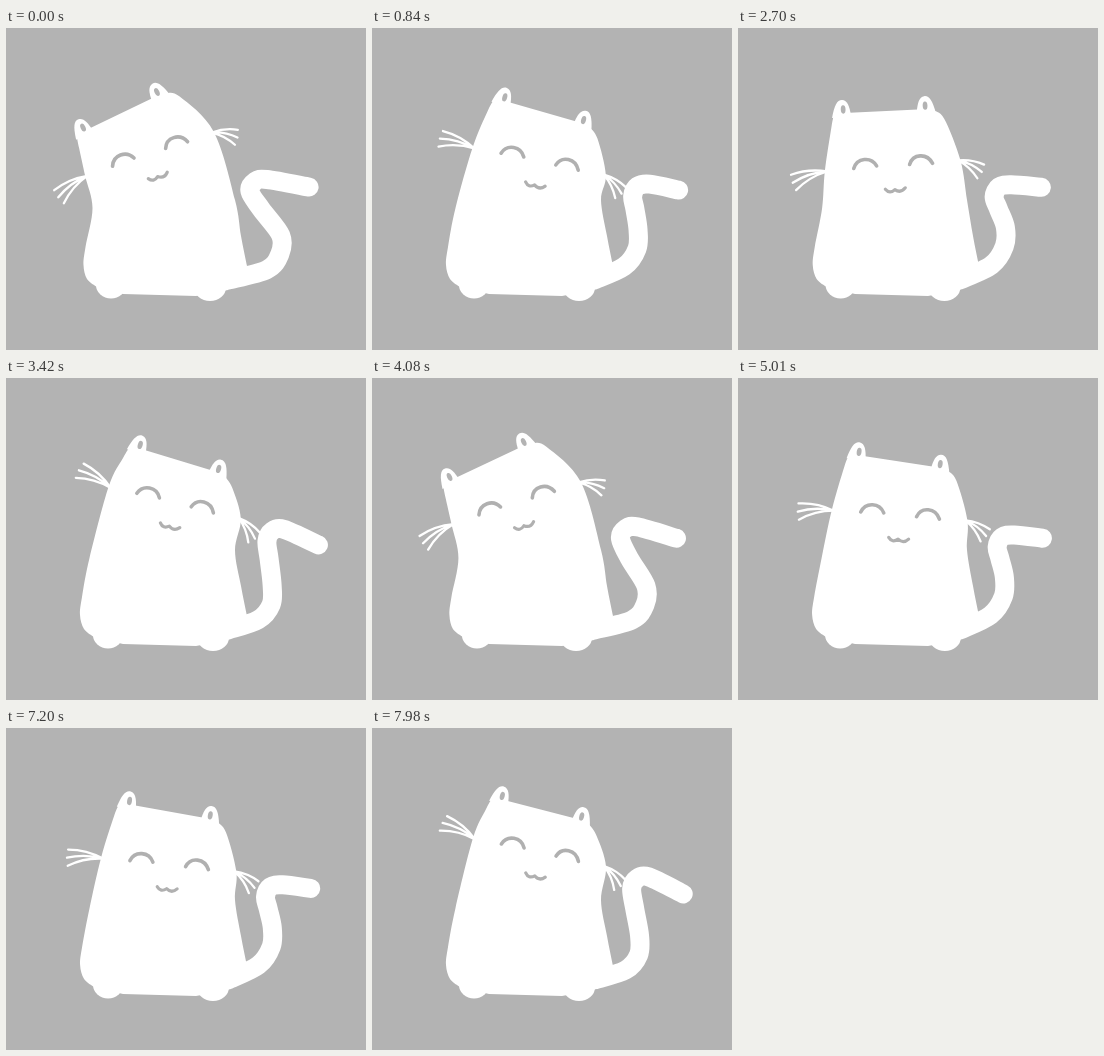
Recreate the animation shown at these times as an HTML page. Size 360x322 px, loop 8000 ms.

```html
<!DOCTYPE html>
<html lang="en">
<head>
<meta charset="utf-8">
<title>Swaying cat</title>
<style>
  html, body { margin: 0; width: 100%; height: 100%; overflow: hidden; background: #b3b3b3; }
  svg { display: block; width: 100vw; height: 100vh; }
  #cat { filter: blur(.6px); }
  .line { fill: none; stroke-linecap: round; stroke-linejoin: round; }
</style>
</head>
<body>
<svg viewBox="0 0 360 322">
  <rect width="360" height="322" fill="#b3b3b3"/>
  <g id="cat">
    <path id="tail" class="line" stroke="#fff" stroke-width="19"/>
    <path id="whiskers" class="line" stroke="#fff" stroke-width="2.3"/>
    <ellipse id="footL" cy="257" rx="15" ry="13.5" fill="#fff"/>
    <ellipse id="footR" cy="259.5" rx="16" ry="13.5" fill="#fff"/>
    <path id="body" fill="#fff"/>
    <g id="ears">
      <path fill="#fff" d="M-52 15C-49 2 -46 -3 -41 -2.5C-36 -2 -34 4 -33 13Z"/>
      <path fill="#fff" d="M52 15C49 2 46 -3 41 -2.5C36 -2 34 4 33 13Z"/>
      <ellipse cx="-40.5" cy="7" rx="2.4" ry="4.2" fill="#b3b3b3"/>
      <ellipse cx="41.5" cy="7" rx="2.4" ry="4.2" fill="#b3b3b3"/>
    </g>
    <g id="face" class="line" stroke="#b0b0b0" stroke-width="3.6">
      <path d="M-39 9.5C-35 -1 -21 -1.5 -16 8.5"/>
      <path d="M17 9.5C21 -1 35 -1 40 10"/>
      <path d="M-9 32.5Q-5 38 .5 33.5Q6 38 11 32.5" stroke-width="3.2"/>
    </g>
  </g>
</svg>
<script>
const LOOP = 8000, CYCLE = 2165;

const $ = id => document.getElementById(id);
const rad = d => d * Math.PI / 180;
const mix = (a, b, u) => a + (b - a) * u;
const progress = (t, from, span) => Math.min(1, Math.max(0, (t - from) / span));
const smooth = u => (1 - Math.cos(Math.PI * u)) / 2;

// 0 = leaning left, 1 = leaning right; loose parts trail behind by lag
const sway = (t, lag) => smooth(progress(t, 115 + lag, 800))
  - smooth(progress(t, 1190 + lag / 4, 750) ** 2);

// Cyclic bump from 0 to 1, highest at the given time
const bump = (t, peak, power) =>
  ((1 + Math.cos(2 * Math.PI * (t - peak) / CYCLE)) / 2) ** power;

const frame = (tilt, x, y) => {
  const c = Math.cos(rad(tilt)), s = Math.sin(rad(tilt));
  return (px, py) => [x + px * c - py * s, y + px * s + py * c];
};

const fmt = p => p.map(v => v.toFixed(2)).join(' ');

// Catmull-Rom segments, continuing from the first point
function curve(pts) {
  let d = '';
  for (let i = 0; i < pts.length - 1; i++) {
    const p = pts[i], q = pts[i + 1], o = pts[i - 1] || p, r = pts[i + 2] || q;
    const c1 = p.map((v, j) => v + (q[j] - o[j]) / 6);
    const c2 = q.map((v, j) => v - (r[j] - p[j]) / 6);
    d += `C${fmt(c1)} ${fmt(c2)} ${fmt(q)}`;
  }
  return d;
}

function whisker(at, x, y, side, angle, len) {
  const dx = side * len * Math.cos(rad(angle)), dy = len * Math.sin(rad(angle));
  const bend = [x + dx / 2 + side * dy * .13, y + dy / 2 - side * dx * .13];
  return `M${fmt(at(x, y))}Q${fmt(at(...bend))} ${fmt(at(x + dx, y + dy))}`;
}

function drawBody(s, head, face) {
  const lean = (1 - s) ** 2;
  const left = [[88 + 3 * lean, 259], [78 + 3 * lean, 251], [74 + 3.5 * lean, 237],
    [76 + 3.5 * lean, 219], [83.5 + 3 * lean, 180], face(-68, 10), head(-53, 24), head(-50, 12)];
  const right = [head(49, 12), head(60, 21), face(68, 9), [229, 172], [235, 208], [241, 238]];
  $('body').setAttribute('d', `M${fmt(left[0])}${curve(left)}L${fmt(head(-34, 10.5))}`
    + `L${fmt(head(34, 10.5))}L${fmt(right[0])}${curve(right)}L222 262L190 268L117 266Z`);
  $('footL').setAttribute('cx', 102 + 3 * lean);
  $('footR').setAttribute('cx', 207 - 3 * lean);
}

function drawTail(t, dip) {
  const bellyX = mix(267, 276, (1 - bump(t, 1000, 1)) ** 2), bellyY = 227 - 9 * dip;
  const elbowX = mix(261, 244, (1 - bump(t, 1100, 1)) ** 2);
  const elbowY = mix(148, 157, bump(t, 620, 1));
  const lift = bump(t, 1300, 2);
  const pts = [[222, 252], [bellyX - 15, 242 - 5 * dip], [bellyX - 2, bellyY],
    [bellyX - 1, bellyY - 19], [mix(elbowX, bellyX, .35), 181], [elbowX, elbowY + 12],
    [elbowX + 5, elbowY + 2], [elbowX + 17, elbowY], [303 + 9.5 * lift, 159 + 8 * lift]];
  $('tail').setAttribute('d', `M${fmt(pts[0])}${curve(pts)}`);
}

function drawWhiskers(swing, face) {
  $('whiskers').setAttribute('d', [-1, 0, 1].map(i =>
    whisker(face, -66, 10.5, -1, swing + i * 13, 36)
    + whisker(face, 66, 9, 1, 34 - swing / 4 + i * 17, 26)).join(''));
}

function draw(ms) {
  const t = ms % CYCLE;
  const s = sway(t, 0), f = sway(t, 50), dip = bump(t, 600, 3);
  const headPose = [mix(-25.7, 17, s), mix(110.5, 175, s),
    mix(75.5, 72, s) - 16 * s * (1 - s) + 3 * dip];
  const facePose = [mix(-18.5, 14, f), mix(140.5, 171, f), mix(116, 115, f) + 13 * dip];
  const head = frame(...headPose), face = frame(...facePose);

  for (const [id, [tilt, x, y]] of [['ears', headPose], ['face', facePose]])
    $(id).setAttribute('transform', `translate(${x} ${y}) rotate(${tilt})`);
  drawBody(s, head, face);
  drawTail(t, dip);
  drawWhiskers(mix(18, -15, sway(t, 240)), face);
}

let start;
function tick(now) {
  start ??= now;
  draw((now - start) % LOOP);
  requestAnimationFrame(tick);
}
draw(0);
requestAnimationFrame(tick);
</script>
</body>
</html>
```
